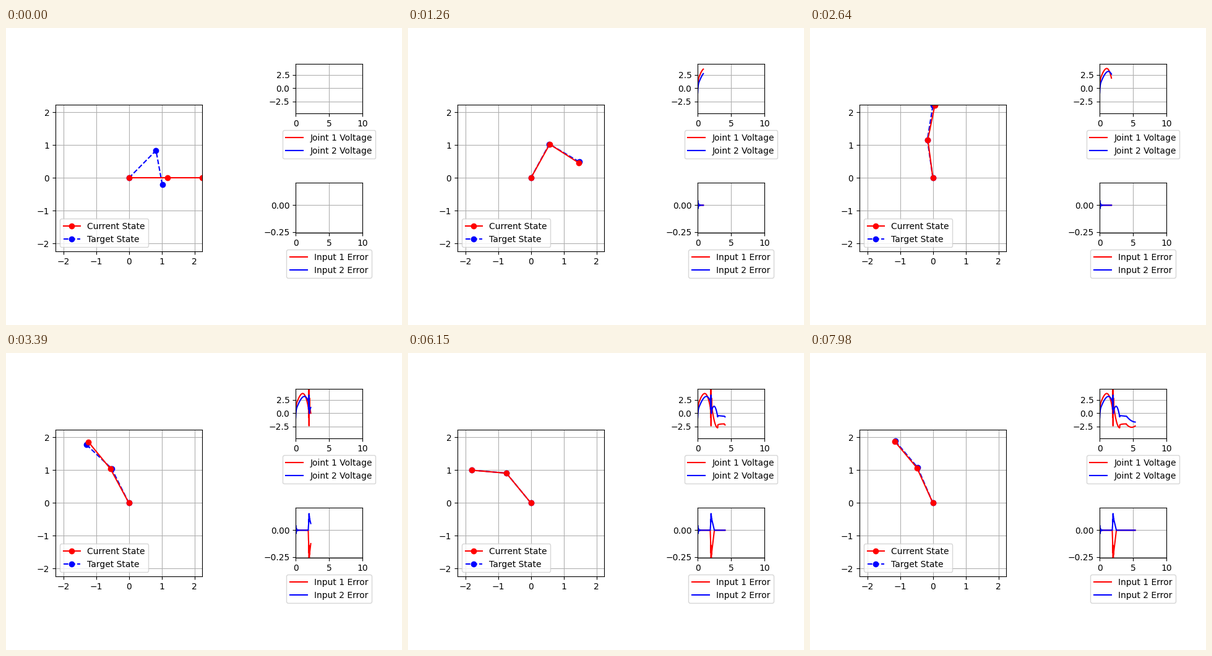
Animation, 640 px wide and 480 px high, one loop 8 s. Source, as a matplotlib script:

```python
import numpy as np
import matplotlib.pyplot as plt
from matplotlib.animation import FuncAnimation

FRAMES, LOOP_MS, DT = 267, 8000, 0.02
L1, L2 = 1.178, 1.06
REACH = L1 + L2
START, GOAL, NEXT = np.array([[45.4, -125], [129.5, 46], [90, -25]])

n = np.arange(FRAMES)
t = n * DT


def ease(u):
    u = np.clip(u, 0, 1)
    return u * u * (3 - 2 * u)


def reference(t):
    """Joint angles in degrees: move, hold, move again."""
    go, back = ease(t / 3)[:, None], ease((t - 4) / 3)[:, None]
    return START + (GOAL - START) * go + (NEXT - GOAL) * back


# A jolt at t = 2: a short rattle, then an error that fades until t = 2.5.
rattle = np.exp(-((t - 2) / .05) ** 2)
flip = (-1.0) ** n
fade = np.clip(np.minimum(4 * (t - 1.88), 2.5 - t), 0, None)


def hump(top, peak, a, b):
    """Cubic hill reached after a quick start-up transient."""
    d = t - peak
    return top - a * d ** 2 - b * d ** 3 - 1.4 * np.exp(-t / .05)


def phases(rise, settle, hold, back):
    return np.select([t < 2.03, t < 3.01, t < 4.01], [rise, settle, hold], back)


volt1 = phases(hump(3.7, 1.05, 2.95, .88),
               -2.75 + 5 * (3 - t) ** 2,
               -2 - .2 * np.exp((3 - t) / .3),
               -2.65 + .9 * (t - 4.8) ** 2) + 3.8 * rattle * (.3 - flip)
volt2 = phases(hump(3.15, 1.3, 2.2, .5),
               1.3 - 6.6 * (t - 2.45) ** 2,
               -.45 - .13 * (t - 3),
               -1.67 + .58 * (5.4 - t) ** 2) + 1.5 * rattle * flip

ring = .06 * np.exp(-t / .09) * np.sin(2 * np.pi * t / .09 + .6)
err1 = -.52 * fade - .08 * rattle * flip - .4 * ring
err2 = .26 * fade + .03 * rattle * flip + ring

# The arm swings in from rest, lags a little, is jolted and later sags.
target = reference(t)
rest = (1 + t / .07) * np.exp(-t / .07)
x = np.clip((t - 1.9) / .3, 0, None)
jolt = np.outer(x * np.exp(1 - x), (2.3, -8))
sag = np.outer(ease(t - 4), (.8, -1.9))
current = (reference(t - .018) + jolt + sag) * (1 - rest)[:, None]


def arm(angles):
    a, b = np.radians(np.cumsum(angles))
    x, y = L1 * np.cos(a), L1 * np.sin(a)
    return [0, x, x + L2 * np.cos(b)], [0, y, y + L2 * np.sin(b)]


fig = plt.figure(figsize=(6.4, 4.8), dpi=100)
grid = fig.add_gridspec(4, 4)

ax = fig.add_subplot(grid[:, :2], aspect="equal", xlim=(-REACH, REACH), ylim=(-REACH, REACH))
ax.set_xticks(range(-2, 3))
ax.set_yticks(range(-2, 3))
ax.grid()
target_arm, = ax.plot([], [], "b--o", label="Target State")
current_arm, = ax.plot([], [], "r-o", label="Current State")
ax.legend(handles=[current_arm, target_arm], loc="lower left")


def chart(row, name, ylim, yticks):
    ax = fig.add_subplot(grid[row, 3], xlim=(0, 10), ylim=ylim)
    ax.set_xticks((0, 5, 10))
    ax.set_yticks(yticks)
    ax.grid()
    lines = [ax.plot([], [], c, label=name.format(i))[0] for i, c in ((1, "r"), (2, "b"))]
    ax.legend(loc="lower center", bbox_to_anchor=(.5, -1))
    return lines


traces = (chart(0, "Joint {} Voltage", (-4.73, 4.61), (-2.5, 0, 2.5))
          + chart(2, "Input {} Error", (-.2554, .2071), (-.25, 0)))
series = (volt1, volt2, err1, err2)


def update(k):
    target_arm.set_data(*arm(target[k]))
    current_arm.set_data(*arm(current[k]))
    for line, values in zip(traces, series):
        line.set_data(t[:k + 1], values[:k + 1])
    return [target_arm, current_arm, *traces]


anim = FuncAnimation(fig, update, frames=FRAMES, interval=LOOP_MS / FRAMES,
                     repeat=True, repeat_delay=0)
plt.show()
```
